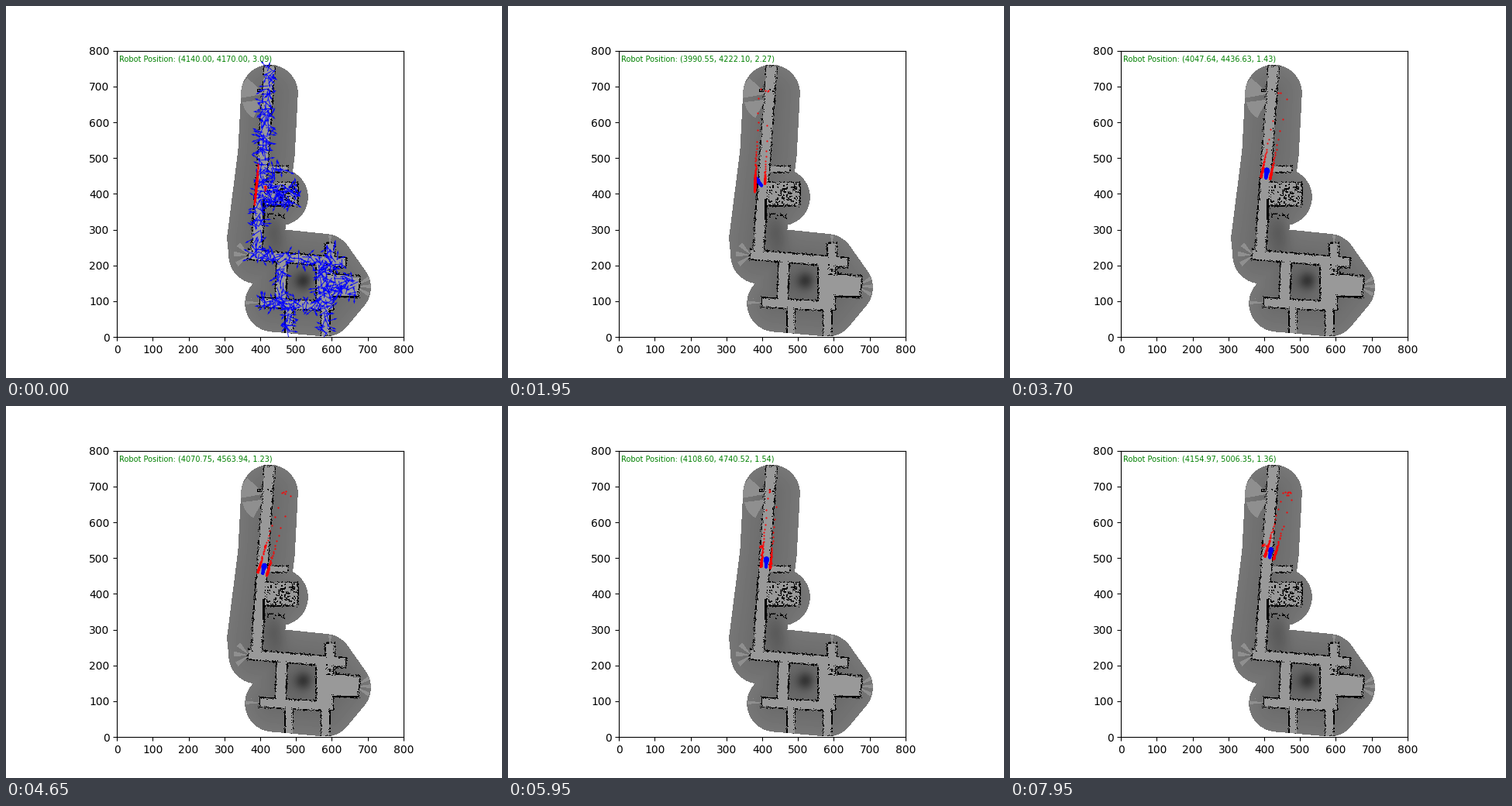
A matplotlib script that plays this animation: 640 by 480 pixels, repeating every 8000 ms.

```python
import numpy as np
import matplotlib.pyplot as plt
from matplotlib.animation import FuncAnimation
from matplotlib.transforms import Affine2D

FRAMES, STEP = 160, 50
COUNT = 560
UNIT = 0.462           # stage pixels per map unit
X0, Y0 = 143.2, 427.2  # stage position of the map's corner
CELLS = 370
REACH = 36.7           # how far the robot saw around its path

fig, ax = plt.subplots(figsize=(6.4, 4.8), dpi=100)
ax.set_aspect("equal")
ax.set_xlim(0, 800)
ax.set_ylim(0, 800)
ax.set_autoscale_on(False)

# lets everything be laid out in stage pixels, y down
stage = Affine2D().translate(-X0, -Y0).scale(1 / UNIT, -1 / UNIT) + ax.transData
rng = np.random.default_rng(12)

side = (np.arange(CELLS) + .5) * 800 * UNIT / CELLS
gx, gy = np.meshgrid(X0 + side, Y0 - 800 * UNIT + side)


def to_map(p):
    return np.column_stack([(p[:, 0] - X0) / UNIT, (Y0 - p[:, 1]) / UNIT])


def seen(x0, y0, x1, y1):
    """Distance of every cell to a stretch of path."""
    dx, dy = x1 - x0, y1 - y0
    s = np.clip(((gx - x0) * dx + (gy - y0) * dy) / (dx * dx + dy * dy), 0, 1)
    return np.hypot(gx - x0 - s * dx, gy - y0 - s * dy)


def hall(x0, y0, x1, y1, half):
    """Signed distance to a straight hall with flat ends."""
    n = np.hypot(x1 - x0, y1 - y0)
    cx, cy = (x1 - x0) / n, (y1 - y0) / n
    along = (gx - x0) * cx + (gy - y0) * cy
    across = (gy - y0) * cx - (gx - x0) * cy
    return np.maximum(np.abs(along - n / 2) - n / 2, np.abs(across) - half)


def fan(x, y, heading, spread, radius, stripes=0):
    """Light patch seen through a gap, whole or split into stripes."""
    a = np.angle(np.exp(1j * (np.arctan2(y - gy, gx - x) - np.radians(heading))))
    hit = (np.abs(a) < np.radians(spread)) & (np.hypot(gx - x, gy - y) < radius)
    return hit & (np.cos(stripes * a) > .1)


def blob(x, y, w, h):
    return np.exp(-((gx - x) / w) ** 2 - ((gy - y) / h) ** 2)


def inside(x0, y0, x1, y1):
    return (gx > x0) & (gx < x1) & (gy > y0) & (gy < y1)


def specks(size):
    n = CELLS // size + 1
    return np.kron(rng.random((n, n)), np.ones((size, size)))[:CELLS, :CELLS]


# ---- map -----------------------------------------------------------------
path = np.min([seen(340, 113, 336, 190), seen(336, 190, 322, 300),
               seen(322, 300, 324, 321), seen(324, 322, 411, 331),
               seen(335, 245, 353, 247), seen(411, 331, 434, 363.5),
               seen(345, 384, 412, 390), seen(434, 363.5, 412, 390),
               seen(356, 330, 354, 384)], axis=0)
gap = np.min([hall(340, 78, 323, 318, 6.3), hall(334, 243, 376, 243, 14.5),
              hall(313, 321, 438, 331.5, 5.8), hall(356, 330, 354, 382, 6.3),
              hall(328, 382.5, 404, 387, 5.5), hall(365, 388, 365, 424, 4.5),
              hall(412, 385, 412, 426, 5), hall(411, 330, 411, 392, 10.5),
              hall(418, 360, 455, 362.5, 13.5), hall(418, 307, 418, 330, 5.5),
              hall(338, 211, 363, 211, 3.5)], axis=0)

shade = .415 + .05 * path / REACH
shade -= .09 * blob(347, 295, 14, 24) + .2 * blob(384, 355, 11, 11)
shade -= .05 * blob(375, 357, 22, 22)
shade[fan(333, 114, 163, 27, 30) | fan(332, 121, 215, 27, 27)] = .56
shade[fan(314, 322, 175, 50, 20, 9) | fan(331, 383, 180, 20, 22, 14)] = .56
shade[fan(450, 362, 0, 40, 21, 12) | fan(418, 312, 90, 22, 16, 12)] = .56

shade[gap < 0] = .6
fine, coarse = specks(1), specks(2)
dense = np.where(gy < 225, .42, .62)
shade[(gap > 0) & (gap < 1.5) & (coarse < dense)] = 0
shade[(gap > -1.3) & (gap < 2.4) & (fine < .16)] = 0
rubble = (inside(336, 229, 376, 259) | inside(412, 333, 431, 347)
          | inside(337, 267, 360, 275) | inside(324, 108, 344, 112))
shade[rubble & (specks(2) < .3) & (fine < .75)] = 0
shade[inside(330.5, 249, 334, 276) | inside(421, 374, 455, 376)] = 0
shade[path > REACH] = 1

ax.imshow(shade, cmap="gray", vmin=0, vmax=1, extent=(0, 800, 0, 800),
          interpolation="nearest", zorder=0.5)

# ---- motion --------------------------------------------------------------
TIMES = [0, 1200, 1800, 2700, 4650, 5950, 6850, 7950]
TRACK = [[4140, 4112.31, 3984, 4023.32, 4070.75, 4108.60, 4116.52, 4154.97],
         [4170, 4174.41, 4206, 4302.62, 4563.94, 4740.52, 4865.96, 5006.35],
         [3.09, 2.95, 2.40, 1.64, 1.23, 1.54, 1.37, 1.36]]


def pose(k):
    return [np.interp(k * STEP, TIMES, values) for values in TRACK]


def turned(theta):
    """1 while facing the side wall, 0 once facing up the corridor."""
    return np.clip((theta - 1.64) / 1.4, 0, 1)


def aim(theta):
    return np.interp(theta, [1.2, 1.6, 3.1], [1.36, 1.54, 3.1])


def scan(k, at, theta, r):
    """Laser hits in stage pixels for a straight corridor with a far end."""
    sec, t = k * STEP / 1000, turned(theta)
    left, right = 7 + 5 * t, 5 - 3.5 * t
    lean = np.radians(np.clip(np.degrees(1.64 - theta), 0, 17) + 5.5 * t)
    end, step = at[1] - 109, at[1] - 181

    a = np.radians(88 * t + np.arange(-90, 90.1, .9))
    sideways, ahead = -np.sin(a), np.cos(a)
    to_side = np.where(sideways < 0, left, right) / np.maximum(np.abs(sideways), 1e-6)
    to_end = np.where(ahead > 0, end / np.maximum(ahead, 1e-6), 1e6)
    d = np.minimum(to_side, to_end)
    u, v = sideways * d, ahead * d
    far = to_end < to_side
    ok = (v < 30 + 80 * sec) & (v > -3 - 20 * t) & (r.random(a.size) < np.where(far, .5, .95))
    u += r.normal(0, 1, a.size) * np.where(far, 1.5, .35)
    v += r.normal(0, 1, a.size) * np.where(far, 1.5, .35)
    u, v = u[ok], v[ok]

    nook = np.clip(2 * (sec - 4), 0, 8)
    if nook > 0:
        u = np.append(u, r.uniform(-left - nook, -left, 9))
        v = np.append(v, step + r.normal(-1, .8, 9))
    if t > .7:
        u = np.append(u, r.normal(0, .8, 9))
        v = np.append(v, r.uniform(-4, 4, 9))
    return (at[0] + u * np.cos(lean) + v * np.sin(lean),
            at[1] + u * np.sin(lean) - v * np.cos(lean))


# starting particles, spread evenly over the free space
rows, cols = np.nonzero(gap < -1)
pick = rng.choice(rows.size, COUNT, replace=False)
start = np.column_stack([gx[0, cols[pick]], gy[rows[pick], 0]])
angle = rng.uniform(-np.pi, np.pi, COUNT)
life = np.minimum(rng.exponential(5, COUNT), 22.5) + .5
# two stray guesses outlive the rest
start[:2], angle[:2], life[:2] = [(335, 93.5), (336, 205)], [.18, 3.05], [30, 33]

arrows = ax.quiver(*to_map(start).T, np.cos(angle), np.sin(angle), color="blue",
                   scale=29, scale_units="width", width=.0024, zorder=2)
hits, = ax.plot([], [], "r.", ms=1.1, zorder=3, transform=stage)
label = ax.text(5, 770, "", color="green", fontsize=7, zorder=4)


def draw(k):
    r = np.random.default_rng(500 + k)
    x, y, theta = pose(k)
    at = np.array([X0 + x / 10 * UNIT, Y0 - y / 10 * UNIT])

    alive = life > k
    spot = np.where(alive[:, None], start, at + r.normal(0, .5, (COUNT, 2)))
    way = np.where(alive, angle + theta - TRACK[2][0],
                   aim(theta) + r.normal(0, .065, COUNT))
    arrows.set_offsets(to_map(spot))
    arrows.set_UVC(np.cos(way), np.sin(way))

    hits.set_data(*scan(k, at, theta, r))
    label.set_text(f"Robot Position: ({x:.2f}, {y:.2f}, {theta:.2f})")
    return arrows, hits, label


anim = FuncAnimation(fig, draw, frames=FRAMES, interval=STEP, repeat=True,
                     repeat_delay=0, init_func=lambda: draw(0))
plt.show()
```
